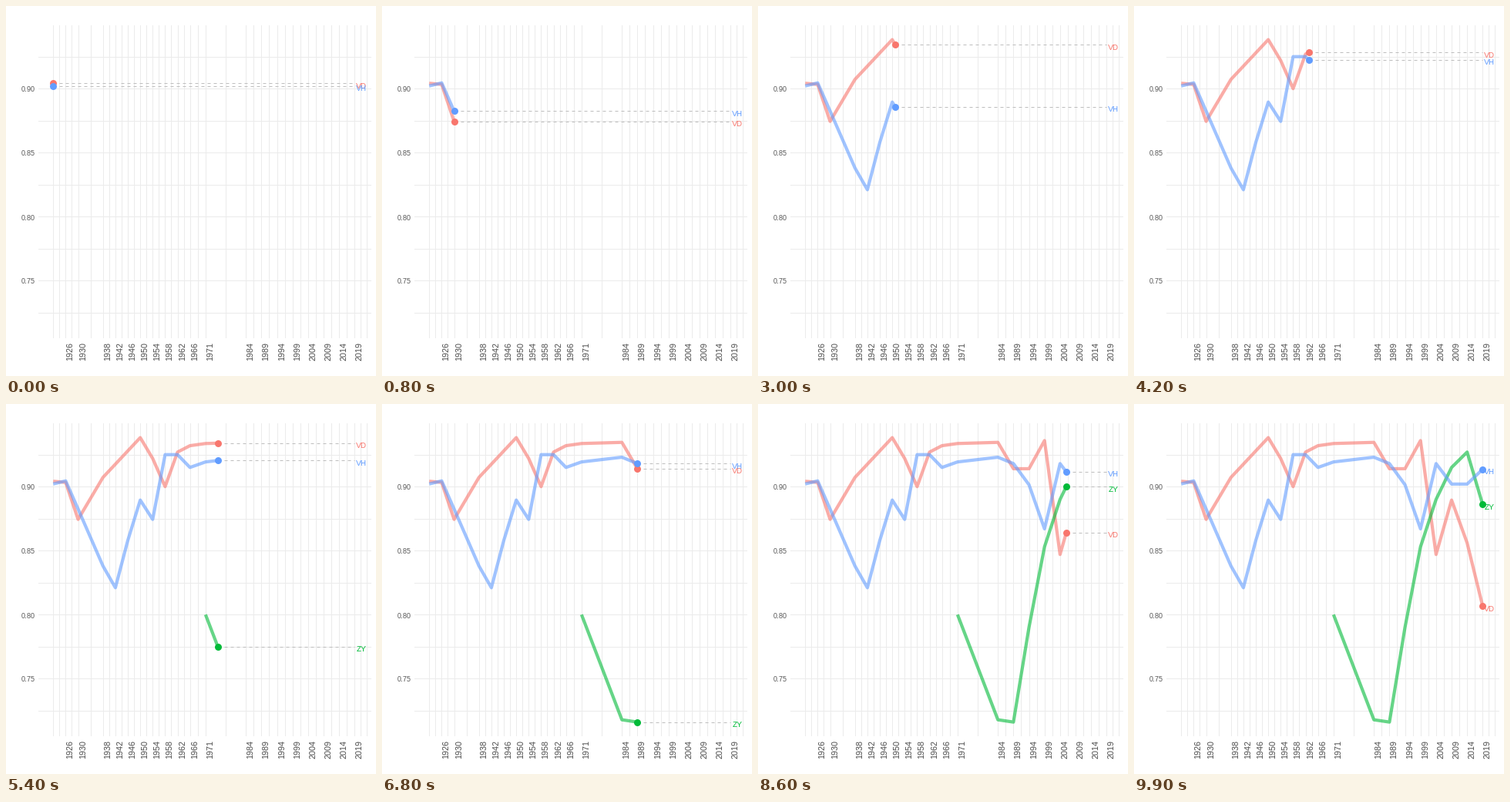
A matplotlib script for the animation above (10000 ms loop, 480 px wide and 480 px high).

```python
import numpy as np
import matplotlib.pyplot as plt
from matplotlib.animation import FuncAnimation
from matplotlib.transforms import ScaledTranslation

SIZE, DPI = 480, 72  # at 72 dpi one point is one pixel
FRAMES, INTERVAL = 100, 100
LEFT, RIGHT, TOP, BOTTOM = 41.63, 474, 24.7, 430.7
GRID, TEXT, DASH = "#EBEBEB", "#4D4D4D", "#BEBEBE"

# Votes every four years with one gap, then every five years after a long gap
YEARS = np.r_[1922:1931:4, 1938:1967:4, 1971, 1984:2020:5]
FIRST, LAST = YEARS[0], YEARS[-1]
TAG_X = LAST + 0.5
KEYS = np.rint((YEARS - FIRST) / (LAST - FIRST) * (FRAMES - 1))

# Turning points per vote, straight runs as linspace; all end with the last vote
SERIES = [
    ("VD", "#F8766D", np.r_[
        .9042, .9033, .8744, np.linspace(.9072, .9383, 4), .922, .900,
        .927, .932, .9337, .9346, .914, .914, .936, .847, .8895, .856, .8066]),
    ("ZY", "#00BA38", np.r_[
        .800, .7178, .716, .790, .853, .890, .915, .927, .886]),
    ("VH", "#619CFF", np.r_[
        .9021, .9045, .8825, .838, .821, .858, .8895, .8744, .925, .925,
        .915, .9193, .923, .918, .9015, .867, .918, .902, .902, .9136]),
]

plt.rcParams.update({"font.family": "Liberation Sans",
                     "text.hinting": "native", "text.hinting_factor": 1})
fig = plt.figure(figsize=(SIZE / DPI, SIZE / DPI), dpi=DPI, facecolor="white")
ax = fig.add_axes([LEFT / SIZE, 1 - BOTTOM / SIZE,
                   (RIGHT - LEFT) / SIZE, (BOTTOM - TOP) / SIZE])
pad = (TAG_X - FIRST) * 0.05
ax.set_xlim(FIRST - pad, TAG_X + pad)
ax.set_ylim(0.9 - 323.5 / 1660, 0.9 + 82.5 / 1660)
ax.set_axis_off()


def shifted(base, dx, dy):
    """Transform moved by pixels, dy pointing down."""
    return base + ScaledTranslation(dx / DPI, -dy / DPI, fig.dpi_scale_trans)


def draw_grid():
    middles = (YEARS[1:] + YEARS[:-1]) / 2
    for x in np.r_[YEARS, middles, LAST + 2, LAST + 4]:
        ax.axvline(x, color=GRID, lw=1, zorder=0)
    for y in np.arange(0.725, 0.94, 0.025):
        ax.axhline(y, color=GRID, lw=1, zorder=0)
    below = shifted(ax.get_xaxis_transform(), 9.2, 5.3)
    for year in YEARS[1:]:
        ax.text(year, 0, str(year), transform=below, size=10.6, color=TEXT,
                rotation=90, rotation_mode="anchor", ha="right", va="baseline")
    beside = shifted(ax.get_yaxis_transform(), -4.1, 4.3)
    for y in np.arange(0.75, 0.92, 0.05):
        ax.text(0, y, f"{y:.2f}", transform=beside, size=9, color=TEXT,
                ha="right", va="baseline")


class Track:
    def __init__(self, label, color, values):
        n = len(values)
        self.years, self.keys, self.values = YEARS[-n:], KEYS[-n:], values
        self.line, = ax.plot([], [], color=color, alpha=0.6, lw=4.2, zorder=2,
                             solid_capstyle="butt", solid_joinstyle="round")
        self.lead, = ax.plot([], [], color=DASH, lw=1, zorder=3,
                             linestyle=(0, (4, 4)), dash_capstyle="butt")
        self.dot, = ax.plot([], [], "o", color=color, ms=9, mew=0, zorder=4)
        self.tag = ax.text(TAG_X, 0, label, color=color, size=10, zorder=5,
                           transform=shifted(ax.transData, -0.1, 6.3),
                           ha="left", va="baseline")
        self.parts = [self.line, self.lead, self.dot, self.tag]

    def update(self, i):
        shown = i >= self.keys[0]
        for part in self.parts:
            part.set_visible(shown)
        if not shown:
            return
        x = np.interp(i, self.keys, self.years)
        y = np.interp(i, self.keys, self.values)
        past = self.keys < i
        self.line.set_data(np.append(self.years[past], x),
                           np.append(self.values[past], y))
        self.lead.set_data([x, LAST], [y, y])
        self.dot.set_data([x], [y])
        self.tag.set_y(y)


draw_grid()
tracks = [Track(*s) for s in SERIES]


def update(i):
    for track in tracks:
        track.update(i)
    return [part for track in tracks for part in track.parts]


anim = FuncAnimation(fig, update, frames=FRAMES, interval=INTERVAL,
                     init_func=lambda: update(0), repeat=True, repeat_delay=0)
plt.show()
```
